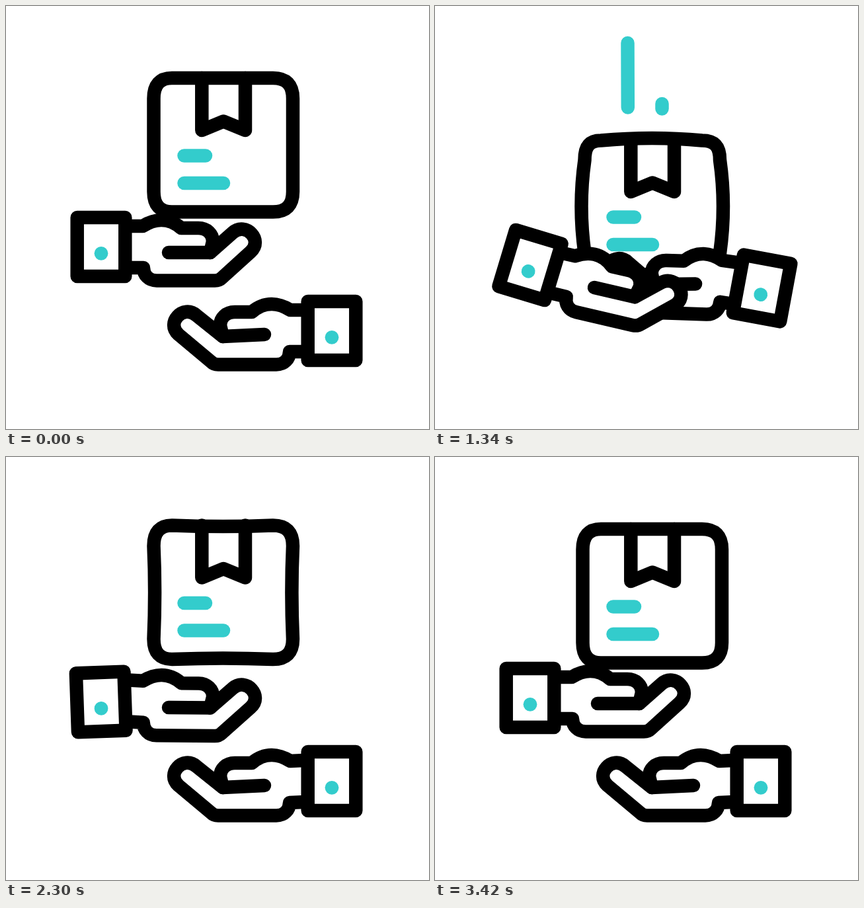
An HTML page with a canvas that plays this animation: 640x640 px, repeating every 3.54 s.

```html
<!DOCTYPE html>
<html lang="en">
<head>
<meta charset="utf-8">
<title>Parcel handover</title>
<style>
html, body { margin: 0; width: 100%; height: 100%; overflow: hidden; background: #fff; }
canvas { display: block; width: 640px; height: 640px; }
</style>
</head>
<body>
<canvas id="stage" width="640" height="640"></canvas>
<script>
const ctx = document.getElementById('stage').getContext('2d');
const LOOP = 3540, STEP = 20, LINE = 20.5, TEAL = '#33cccc';

// Keys start with a time; values left out are 0
// Box: vertical offset
const boxLift = [
  [200], [300, 5], [420, -3], [520, -28], [680, -53], [880, -6], [1120, 74],
  [1340, 93], [1450, 104], [1560, 98], [1880, -22], [2064, -46], [2300, -5.5],
  [2480, 20], [2640, 19], [2900, 8.5], [3110, -24], [3310], [3360, 2], [3420]
];
// Box: bulge of the sides, negative pinches them
const boxBulge = [
  [200], [300, .5], [520, -.8], [880, -.15], [1340, 1], [1560, 1], [1880, -1],
  [2300, -.4], [2480, .7], [2900, .8], [3110, -.6], [3420]
];
// Cuff: dy, turn
const leftCuff = [
  [200], [500, -9, -18], [720, -10, 3], [880, -9.5, 15], [1340, 27.5, 16.8],
  [1450, 37, 19], [1700, 24, 6], [1880, 10.5, -2], [2300, 6, -2], [2480, 16, 2],
  [2900, -3, -7], [3000, -6, -9], [3250]
];
const rightCuff = [
  [900], [1120, -38, -5], [1340, -64.5, -10.5], [1450, -52, -14], [1560, -54, -12],
  [1800, -20, -3], [1880, -1]
];
// Palm: dx, dy, turn, finger bend
const leftPalm = [
  [200], [500, 5, -34, -12, 6], [720, -4, -5, 5], [880, -13, 32, 30.5], [1340, -5, 53, 13],
  [1450, -5, 64, 12], [1700, -2, 36, 5], [1880, 0, 10.5, .5], [2300, 0, 6, .5],
  [2480, 0, 20, 1], [2900, 9.5, -9, 0, 20], [3000, 6, -18, -4, 10], [3250]
];
const rightPalm = [
  [900], [1120, -2, -45, -1], [1340, -3, -76.5, -2], [1450, -3, -64, -2], [1560, -3, -67, -2],
  [1800, 0, -22, 0, 8], [1880, 2, -1, 0, 16], [1960, 0, 0, 0, -3], [2060]
];

// Smooth curve through the keys, flat at turning points and at the ends
function sample(keys, t, c = 1) {
  const value = i => keys[i][c] || 0;
  const slope = i => {
    if (i < 1 || i > keys.length - 2) return 0;
    const before = value(i) - value(i - 1), after = value(i + 1) - value(i);
    return before * after <= 0 ? 0 : (before + after) / (keys[i + 1][0] - keys[i - 1][0]);
  };
  const next = keys.findIndex(k => k[0] > t);
  if (next < 0) return value(keys.length - 1);
  if (next === 0) return value(0);
  const i = next - 1, d = keys[next][0] - keys[i][0];
  const u = (t - keys[i][0]) / d, v = 1 - u;
  return value(i) * v * v * (1 + 2 * u) + value(next) * u * u * (3 - 2 * u)
    + d * u * v * (v * slope(i) - u * slope(next));
}

const clamp = u => Math.min(1, Math.max(0, u));
const ease = (t, from, to) => { const u = clamp((t - from) / (to - from)); return u * u * (3 - 2 * u); };

function mover(px, py, dx, dy, degrees) {
  const a = degrees * Math.PI / 180, c = Math.cos(a), s = Math.sin(a);
  return (x, y) => [px + dx + (x - px) * c - (y - py) * s, py + dy + (x - px) * s + (y - py) * c];
}
function line(x1, y1, x2, y2, color) {
  ctx.strokeStyle = color;
  ctx.beginPath();
  ctx.moveTo(x1, y1);
  ctx.lineTo(x2, y2);
  ctx.stroke();
}
function dot(x, y) {
  ctx.fillStyle = TEAL;
  ctx.beginPath();
  ctx.arc(x, y, 10.4, 0, 7);
  ctx.fill();
}
function outline() {
  ctx.fillStyle = '#fff';
  ctx.strokeStyle = '#000';
  ctx.fill();
  ctx.stroke();
}

function drawBox(dy, bulge) {
  const inset = 3 * Math.max(0, bulge), out = bulge * (bulge > 0 ? 2 : 4);
  const l = 223.5 + inset, r = 434 - inset, t = 109 + inset * .5, b = 311.5 - inset * .5;
  const pull = 2 * out + 2 * inset, lift = 2 * out + inset;
  ctx.save();
  ctx.translate(0, dy);
  ctx.beginPath();
  ctx.moveTo(251, t);
  ctx.quadraticCurveTo(329, t - lift, 404, t);
  ctx.bezierCurveTo(424, t, r, t + 10, r, 140);
  ctx.quadraticCurveTo(r + pull, 210, r, 281);
  ctx.bezierCurveTo(r, b - 10, 424, b, 404, b);
  ctx.quadraticCurveTo(329, b + lift, 251, b);
  ctx.bezierCurveTo(233, b, l, b - 10, l, 281);
  ctx.quadraticCurveTo(l - pull, 210, l, 140);
  ctx.bezierCurveTo(l, t + 10, 233, t, 251, t);
  ctx.closePath();
  outline();
  ctx.beginPath();
  ctx.moveTo(296.3, 109);
  ctx.lineTo(296.3, 188);
  ctx.lineTo(329, 174.5);
  ctx.lineTo(362, 188);
  ctx.lineTo(362, 109);
  ctx.stroke();
  line(269.5, 226.5, 302, 226.5, TEAL);
  line(269.5, 268, 329, 268, TEAL);
  ctx.restore();
}

function drawHand(t, cuffKeys, palmKeys, thumbY, tipX, tipY) {
  const cuffY = sample(cuffKeys, t, 1), turn = sample(cuffKeys, t, 2);
  const cuffX = Math.min(0, turn * .15);
  const [palmX, palmY, palmTurn, bend] = [1, 2, 3, 4].map(c => sample(palmKeys, t, c));
  const cuff = mover(144, 364.5, cuffX, cuffY, turn);
  const palm = mover(246, 373, palmX, palmY, palmTurn);
  const joint = mover(309, 373, 0, 0, bend);
  const tip = (x, y) => palm(...joint(x + tipX, y + tipY));
  const to = p => ctx.lineTo(...p);
  const curve = (...points) => ctx.bezierCurveTo(...points.flat());

  ctx.beginPath();
  ctx.moveTo(...cuff(186, 333));
  to(palm(207, 333));
  curve(palm(215, 328), palm(223, 324), palm(235, 324));
  curve(palm(247, 324), palm(257, 329), palm(265, 336));
  to(palm(291, 336));
  curve(palm(304, 336), palm(313, 345), palm(313, 356));
  to(palm(309, 373));
  to(tip(343, 343));
  curve(tip(362.8, 325.6), tip(389.8, 354.6), tip(370, 372));
  to(palm(327, 411));
  curve(palm(324, 414), palm(321, 415.5), palm(316, 415.5));
  to(palm(228, 415.5));
  curve(palm(216, 415.5), palm(208, 407), palm(208, 396));
  to(cuff(186, 396));
  outline();
  line(...palm(246, 373 + thumbY), ...palm(309, 373), '#000');

  ctx.save();
  ctx.translate(144 + cuffX, 364.5 + cuffY);
  ctx.rotate(turn * Math.PI / 180);
  ctx.beginPath();
  ctx.rect(-36.3, -44.5, 72.6, 89);
  outline();
  dot(0, 9.8);
  ctx.restore();
}

// A line that grows from its start, then shrinks into its end
function streak(x1, y1, x2, y2, head, tail) {
  if (head <= 0 || tail >= 1) return;
  const at = u => [x1 + (x2 - x1) * u, y1 + (y2 - y1) * u];
  line(...at(tail), ...at(head), TEAL);
}
function burst(t, x, y, dx, dy, start) {
  streak(x, y, x + 42 * dx, y + 42 * dy, ease(t, start, start + 150), ease(t, start + 130, start + 300));
}

function drawAccents(t) {
  streak(291.5, 56, 291.8, 153.5, ease(t, 1100, 1240), ease(t, 1340, 1480));
  streak(343.5, 86, 343.5, 155.5, ease(t, 1060, 1200), clamp((t - 1250) / 101));
  burst(t, 203, 211, -.58, -.82, 2858);
  burst(t, 152, 252.5, -.9, -.44, 2898);
  burst(t, 137, 313, -1, 0, 2882);
}

function draw(t) {
  ctx.fillStyle = '#fff';
  ctx.fillRect(0, 0, 640, 640);
  ctx.lineWidth = LINE;
  ctx.lineCap = ctx.lineJoin = 'round';
  drawBox(sample(boxLift, t), sample(boxBulge, t));
  ctx.save();
  ctx.transform(-1, 0, 0, 1, 637, 127);
  drawHand(t, rightCuff, rightPalm, -3, 6, -2);
  ctx.restore();
  drawHand(t, leftCuff, leftPalm, 0, 0, 0);
  drawAccents(t);
}

const begin = performance.now();
function frame() {
  const t = (performance.now() - begin) % LOOP;
  draw(Math.floor(t / STEP) * STEP);
  requestAnimationFrame(frame);
}
frame();
</script>
</body>
</html>
```
